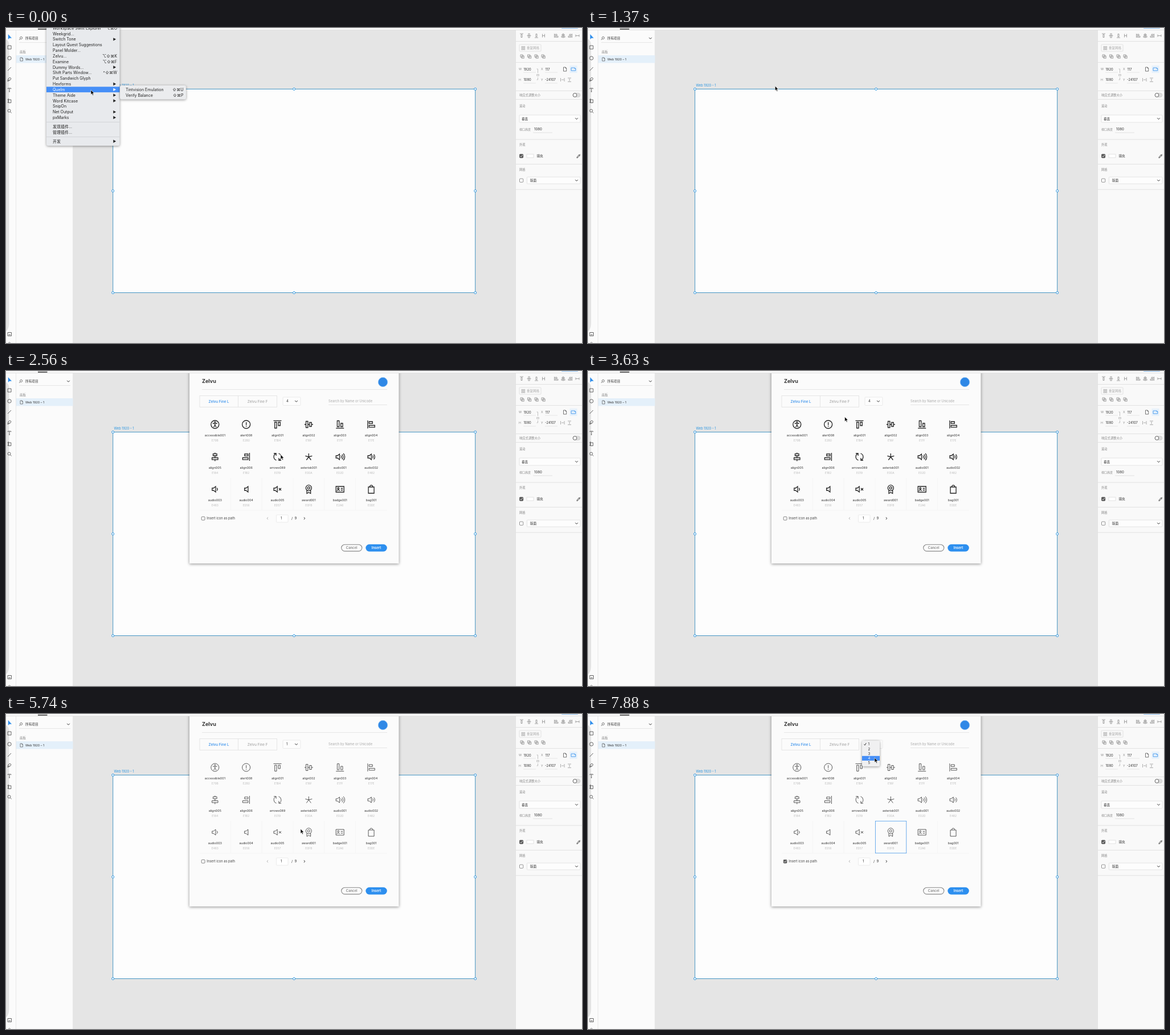
Write an HTML page that moves like this. It is 1011 px wide and 554 px high and loops after 8 s.

```html
<!DOCTYPE html>
<html lang="zh">
<head>
<meta charset="utf-8">
<style>
  html, body { margin: 0; width: 100%; height: 100%; overflow: hidden; background: #e5e5e5; }
  svg { display: block; width: 1011px; height: 554px; font-family: Inter, "Noto Sans CJK SC", "DejaVu Sans", sans-serif; }
  text { white-space: pre; }
  .menu { filter: drop-shadow(0 1px 2px rgba(0, 0, 0, .4)); }
  .sheet { filter: drop-shadow(0 1px 2.5px rgba(0, 0, 0, .45)); }
</style>
</head>
<body>
<svg id="stage" viewBox="0 0 1011 554"></svg>
<script>
const BLUE = '#2d8ceb', DARK = '#333', GRAY = '#999';

// Drawing helpers; text is centred vertically on y.
const text = (x, y, s, size = 5.6, fill = DARK, extra = '') =>
  `<text x="${x}" y="${y + size * .36}" font-size="${size}" fill="${fill}" ${extra}>${s}</text>`;
const mid = 'text-anchor="middle"', end = 'text-anchor="end"';
const rect = (x, y, w, h, fill = 'none', stroke = 'none', r = 0) =>
  `<rect x="${x}" y="${y}" width="${w}" height="${h}" rx="${r}" fill="${fill}" stroke="${stroke}" stroke-width=".8"/>`;
const path = (d, stroke = DARK, w = .8, fill = 'none', x = 0, y = 0) =>
  `<path d="${d}" transform="translate(${x} ${y})" fill="${fill}" stroke="${stroke}" stroke-width="${w}"/>`;
const group = (id, body, extra = '') => `<g id="${id}" ${extra}>${body}</g>`;
const ring = (r, x = 0, y = 0) => `M${x - r} ${y}a${r} ${r} 0 1 0 ${2 * r} 0a${r} ${r} 0 1 0 ${-2 * r} 0z`;
const box = (x, y, w, h) => `M${x} ${y}h${w}v${h}h${-w}z`;
const chevron = (x, y) => path('M-2.3-1.2L0 1.2L2.3-1.2', DARK, 1, 'none', x, y);
const hline = (x1, x2, y, color = '#e1e1e1') => path(`M${x1} ${y}H${x2}`, color, 1);

function leftPanel() {
  const tools = [
    [34, box(-3, -3, 6, 6)], [53, ring(3.2)], [72, 'M-3 3L3-3'],
    [90, 'M-3 3.5L-2-1L1-3L3-1L1 2zM-3 3.5L0 .5'], [109, 'M-2.8-1.8V-3H2.8V-1.8M0-3V3M-1 3H1'],
    [128, 'M-1.8-4V2.8H-3.5M-3.5-2H2.8V3.5H-1.8V-2'], [146, ring(2.5, -.5, -.5) + 'M1.4 1.4L3.6 3.6'],
    [538.5, box(-3, -3, 6.5, 6) + 'M-1.5 1H2']
  ];
  return rect(0, 4, 118, 550, '#fbfbfb') +
    path('M0 20Q5 23 5 30V518Q5 529 0 533z', '#d5d5d5', .5, '#e4e4e4') +
    path('M17.5 4V554M117.5 4V554', '#e2e2e2', .8) +
    path('M-2-4V4L0 2H3.5z', BLUE, .5, BLUE, 6, 15.5) +
    tools.map(([y, d]) => path(d, '#555', .9, 'none', 6, y)).join('') +
    path('M4 554L6 552.5L8 554', '#777') +
    path(ring(2, .6, -.6) + 'M-.9.9L-3 3', '#555', .8, 'none', 26, 18) +
    text(34, 18, '所有项目', 5.7) + chevron(109.5, 18) + hline(23, 113, 25.5, '#e6e6e6') +
    text(24, 42, '画板', 5.4, '#888') + rect(18, 48, 99.5, 13.5, '#e4f0fa') +
    path('M-2-3H1L2.4-1.6V3H-2zM1-3V-1.6H2.4', '#555', .7, 'none', 27, 55) +
    text(34, 54.8, 'Web 1920 – 1', 5.4);
}

function artboard() {
  const [l, t, r, b] = [187.7, 107.4, 823.7, 465.5], cx = 505.6, cy = 286.5;
  const knobs = [[l, t], [cx, t], [r, t], [l, cy], [r, cy], [l, b], [cx, b], [r, b]];
  return text(189.5, 101, 'Web 1920 – 1', 5.7, '#2a95e0') +
    path(box(l, t, r - l, b - t), '#4595c2', 1, '#fdfdfd') +
    knobs.map(([x, y]) => path(ring(2, x, y), '#2a95e0', 1, '#fff')).join('');
}

function rightPanel() {
  const label = (x, y, s, size = 5.2) => text(x, y, s, size, '#888');
  const bar = 'M-3-3.5H3M-1-2h2V3h-2z', flip = 'M-3 3.5H3M-1-3h2V2h-2z';
  const aligns = [[905, bar], [918, 'M-3.5 0H3.5M-1.2-3.5h2.4v7h-2.4z'], [931, flip], [943.5, 'M-2-3v6M2-3v6M-2 0h4'],
    [966, 'M-3.5-3.5v7M-2-2.5h3v2h-3zM-2 .8h5v2h-5z'], [978, 'M0-4V4M-2-2.5h4v2h-4zM-3 .8h6v2h-6z'],
    [990, 'M3.5-3.5v7M-1-2.5h3v2h-3zM-3 .8h5v2h-5z'], [1003, 'M-3-2v4M3-2v4M-3 0h6']];
  const overlap = box(-3, -3, 4.2, 4.2) + box(-1, -1, 4.2, 4.2);
  const check = 'M902.5 225l1.6 1.7l2.8-3.4';
  return rect(894, 4, 117, 550, '#f9f9f9') + path('M894.5 4V554', '#dcdcdc', .8) +
    aligns.map(([x, d]) => path(d, GRAY, .9, 'none', x, 13.5)).join('') +
    [906, 918.5, 931, 943].map(x => path(overlap, '#888', .8, 'none', x, 50)).join('') +
    [23.5, 60.5, 110.5, 125.5, 196, 239.5, 284].map(y => hline(895, 1011, y)).join('') +
    rect(901, 29, 38, 12, 'none', '#dcdcdc', 1) + path(box(905, 32.5, 2.2, 2.2) + box(908.5, 32.5, 2.2, 2.2) + box(905, 36, 2.2, 2.2) + box(908.5, 36, 2.2, 2.2), GRAY, .7) +
    text(914, 35, '重复网格', 5.5, '#aaa') +
    label(900, 72.5, 'W') + text(908.5, 72.5, '1920', 5.8) + label(939, 72.5, 'X') + text(946.5, 72.5, '117', 5.8) +
    label(900, 91, 'H') + text(908.5, 91, '1080', 5.8) + label(939, 91, 'Y') + text(946, 91, '-24107', 5.8) +
    [78, 97].map(y => hline(908, 930, y, '#e6e6e6') + hline(946, 968, y, '#e6e6e6')).join('') +
    path('M931.5 72h2v7M931.5 91h2v-4' + box(931.7, 81.5, 3.6, 2.6), '#aaa', .7) +
    path('M-2.5-3.5H1L2.7-1.8V3.5H-2.5zM1-3.5V-1.8H2.7', '#555', .8, 'none', 981, 72.5) +
    rect(989.5, 66, 13, 13, '#e6f1fb') + path('M-4-2.5H2.3L3.8-1V2.5H-4zM2.3-2.5V-1H3.8', BLUE, .8, 'none', 996, 72.5) +
    path('M973.5 88v6M980 88v6M975 91h4M986 88h6M986 94.5h6M989 89v4.5', GRAY) +
    label(901, 118, '响应式调整大小', 5.3) + rect(995, 114.5, 13, 7, '#ddd', '#ccc', 3.5) + path(ring(3.3, 998.5, 118), '#555', .9, '#fff') +
    label(901, 137.5, '滚动') + rect(901, 153, 107, 13, '#fdfdfd', '#ddd', 1) + text(905, 159.5, '垂直') + chevron(1001.5, 159.5) +
    label(901, 178, '视口高度', 5) + text(927, 178, '1080', 6) + hline(925, 959, 184) +
    label(901, 205.5, '外观') + rect(901.5, 222, 6.2, 6.2, '#555', '#555', 1) + path(check, '#fff', .9) +
    rect(914, 222, 12, 6, '#fff', '#ddd') + text(931.5, 225, '填充') +
    path('M-3 3.5L-2.5 1.5L1-2L2.2-.8L-1.3 2.8zM.2-2.4L2.6 0M1.4-1.6L3-3', '#444', 1, 'none', 1005, 225) +
    label(901, 249.5, '网格') + rect(901.5, 265, 6.2, 6.2, '#fff', '#777', 1) +
    rect(914.5, 262, 93.5, 12, '#fdfdfd', '#ddd', 1) + text(920, 268, '版面') + chevron(1001.5, 268);
}

const MENU = [['Workspace Swift Explorer', '⌥⌘O'], ['Weekgrid...'], ['Switch Tone', 1], ['Layout Quest Suggestions'], ['Panel Molder...'],
  ['Zelvu...', '⌥⇧⌘K'], ['Examine', '⌥⇧⌘F'], ['Dummy Words...', 1], ['Shift Parts Window...', '^⇧⌘W'], ['Put Sandwich Glyph'],
  ['Hexforms', 1], ['Quelm', 1], ['Theme Aide', 1], ['Word Kitcase', 1], ['SnipOn'], ['Net Output', 1], ['pxMarks', 1]];
const rowY = i => .2 + 9.83 * i;

function menuRow([name, key], y, color) {
  const right = key === 1 ? path('M0-2.7L4.8 0L0 2.7z', 'none', 0, color, 188.3, y) : key ? text(195, y, key, 7, color, end) : '';
  return text(82, y, name, 7, color) + right;
}

function menu(active) {
  const y = rowY(active);
  const sub = active === 11 ? group('sub', rect(200, 101, 116, 24.5, '#ebecee', 'none', 3) +
    text(210, 108.2, 'Tintvision Emulation', 7, '#222') + text(311.5, 108.2, '⇧⌘U', 7, '#222', end) +
    text(210, 118, 'Verify Balance', 7, '#222') + text(311.5, 118, '⇧⌘P', 7, '#222', end), 'class="menu"') : '';
  return group('list', rect(71, -6, 128.5, 213, '#e8eaed', 'none', 3), 'class="menu"') +
    rect(71, y - 5, 128.5, 9.8, '#468ff7') +
    MENU.map((m, i) => menuRow(m, rowY(i), i === active ? '#fff' : '#222')).join('') +
    hline(71, 199.5, 165.5, '#d2d4d8') + hline(71, 199.5, 191.5, '#d2d4d8') +
    menuRow(['发现插件...'], 173.5, '#222') + menuRow(['管理插件...'], 183.5, '#222') + menuRow(['开发', 1], 199.3, '#222') + sub;
}

// Each icon: body (solid in the filled set), inner (white when filled), extra lines.
const speaker = x => `M${x}-2h2.5l3.7-3V5l-3.7-3h-2.5z`;
const waves = (x, n) => [2.4, 4.2, 6].slice(0, n).map((h, i) => `M${x + 2.2 * i}${-h}a${h * 1.4} ${h * 1.4} 0 0 1 0 ${2 * h}`).join('');
const ICONS = {
  accessible001: ['E79B', ring(7), ring(.9, 0, -4) + 'M-4-2L0-1.4L4-2M0-1.4V1.2M-2.4 5L0 1.2L2.4 5', ''],
  alert002: ['E293', 'M-1-6.5H1L.5 2H-.5z' + box(-.6, 5, 1.2, 1.2), '', ''],
  alert008: ['E2B0', ring(7), 'M0-4V1.2M0 2.6V4', ''],
  align001: ['E1B4', box(-4.8, -4, 3.3, 10.5) + box(1.5, -4, 3.3, 6), '', 'M-7-6.6H7'],
  align002: ['E18F', box(-4.8, -5.5, 3.3, 11) + box(1.5, -3.5, 3.3, 7), '', 'M-7.5 0h2.7M-1.5 0h3M4.8 0h2.7'],
  align003: ['E17F', box(-4.8, -6.5, 3.3, 10.5) + box(1.5, -2, 3.3, 6), '', 'M-7 6.6H7'],
  align004: ['E17E', box(-3.8, -5, 6, 3.4) + box(-3.8, 1.5, 10, 3.4), '', 'M-6.2-7V7'],
  align005: ['E184', box(-3.3, -5.4, 6.6, 3.4) + box(-5.2, 1.5, 10.4, 3.4), '', 'M0-7.5v2.1M0-2v3.5M0 4.9v2.6'],
  align006: ['E1B2', box(-2.8, -5, 6, 3.4) + box(-6.3, 1.5, 9.5, 3.4), '', 'M5.8-7V7'],
  arrows089: ['E019', '', '', 'M-6.5-6H-2.4V-2M-2.6-5.8A6.3 6.3 0 0 0-2 6M6.5 6H2.4V2M2.6 5.8A6.3 6.3 0 0 0 2-6'],
  asterisk001: ['E00A', '', '', 'M0-6V0M-6-1.6L0 0L6-1.6M-4 5.5L0 0L4 5.5'],
  audio001: ['E02D', speaker(-7), '', waves(1.5, 3)],
  audio002: ['E482', speaker(-6), '', waves(2.3, 2)],
  audio003: ['E483', speaker(-5), '', waves(3.4, 1)],
  audio004: ['E056', speaker(-3), '', ''],
  audio005: ['E057', speaker(-6.5), '', 'M2.5-2l4 4M6.5-2l-4 4'],
  audio007: ['E00C', ring(7), speaker(-3.5), ''],
  award001: ['E0FB', ring(5, 0, -2.3) + 'M-3.3 1.6V7.3L0 5.4L3.3 7.3V1.6', ring(2.1, 0, -2.3), ''],
  badge001: ['E2A6', box(-7, -5, 14, 10), ring(1.4, -3, -1.5) + 'M-5.3 2.8a2.4 2 0 0 1 4.7 0M1.5-1.5H5M1.5 1.5H5', ''],
  bag001: ['E0DE', box(-5, -4, 10, 11), '', 'M-2.5-4V-4.6a2.5 2.5 0 0 1 5 0V-4'],
  balloon001: ['E23D', 'M-2.2 3.2C-2.8 2-5.3 1-5.3-1.8A5.3 5.3 0 0 1 5.3-1.8C5.3 1 2.8 2 2.2 3.2z' + box(-1.5, 5, 3, 2), '', ''],
  battery001: ['E37F', '', '', box(-8, -3.7, 14, 7.4) + 'M7.8-1.5v3']
};
const ALIGNS = [1, 2, 3, 4, 5, 6].map(n => 'align00' + n);
const LINE_SET = ['accessible001', 'alert008', ...ALIGNS, 'arrows089', 'asterisk001', 'audio001', 'audio002',
  'audio003', 'audio004', 'audio005', 'award001', 'badge001', 'bag001'];
const FILL_SET = ['accessible001', 'alert002', 'alert008', ...ALIGNS, 'arrows089', 'audio001', 'audio005',
  'audio007', 'award001', 'badge001', 'bag001', 'balloon001', 'battery001'];

function iconCell(name, i, filled, weight) {
  const x = 366.8 + 54.85 * (i % 6), y = 94 + 57 * Math.floor(i / 6);
  const [code, body, inner, extra] = ICONS[name], w = weight === 4 ? 1.3 : .75, ink = filled ? '#000' : '#222';
  return path(box(-27.4, -37 + 31, 0, 0), 'none') +
    path(body, ink, w, filled ? ink : 'none', x, y) + path(inner, filled ? '#fff' : ink, w, 'none', x, y) + path(extra, ink, w, 'none', x, y) +
    text(x, y + 19.5, name, 5.4, DARK, mid) + text(x, y + 28.5, code, 4.9, '#bbb', mid);
}

function sheet({ filled, weight, checked, selected }) {
  const tab = (x, s, on) => text(x, 53.6, s, 6.2, on ? BLUE : GRAY, mid + (on ? ' font-weight="500"' : ''));
  return rect(322, -10, 367.5, 348.5, '#fbfbfb') +
    text(344, 17.5, 'Zelvu', 9, DARK, 'font-weight="700"') + path(ring(8.2, 661.5, 19.5), '#8cc0f5', .8, '#2f88e6') + hline(344, 669, 32.5, '#e6e6e6') +
    rect(340, 43.5, 135.5, 20, 'none', '#e0e0e0') + path('M407.5 43.5v20', '#e0e0e0') +
    tab(373.5, 'Zelvu Fine L', !filled) + tab(441.5, 'Zelvu Fine F', filled) +
    rect(486, 46, 31, 14.5, '#fdfdfd', '#e6e6e6', 1) + text(492, 53.2, weight, 6) + chevron(509.5, 53.2) +
    text(566, 53.3, 'Search by Name or Unicode', 5.8, '#aaa') + hline(566, 669, 59.5, '#e6e6e6') +
    path([1, 2, 3, 4, 5].map(i => `M${339.4 + 54.85 * i} 188V245`).join('') + 'M340 244.8H669', '#f4f4f4', .8) +
    (filled ? FILL_SET : LINE_SET).map((n, i) => iconCell(n, i, filled, weight)).join('') +
    (selected ? rect(504.4, 188.3, 54.4, 56.4, 'none', '#4a9cec') : '') +
    rect(343.2, 256.4, 5.8, 5.8, checked ? '#555' : '#fff', '#666', 1) + (checked ? path('M344.3 259.3l1.4 1.5l2.4-3', '#fff', .9) : '') +
    text(352.3, 259.2, 'Insert icon as path', 5.7, '#444') +
    path('M459.8 257.2l-1.6 2l1.6 2', '#aaa', .9) + rect(474.5, 253, 20.5, 13, '#fff', '#e6e6e6', 1) + text(482, 259.3, '1', 6) +
    text(501, 259.3, '/  9', 6) + path('M523 257.2l1.6 2l-1.6 2', DARK, 1) +
    path('M594.5 305.3H619a5.8 5.8 0 0 1 0 11.6H594.5a5.8 5.8 0 0 1 0-11.6z', '#888', 1.1) + text(606.7, 311.2, 'Cancel', 5.9, '#888', mid + ' font-weight="600"') +
    rect(631.3, 304.8, 37.5, 12.6, '#2d8fef', 'none', 6.3) + text(650, 311.2, 'Insert', 5.9, '#fff', mid + ' font-weight="600"');
}

function dropdown(active) {
  const y = i => 53.2 + 8.2 * i;
  return group('drop', rect(481, 47, 31, 45, '#f0f0f1', 'none', 2.5), 'class="menu"') + rect(481, y(active) - 4, 31, 8.2, '#468ff7') +
    [0, 1, 2, 3, 4].map(i => text(491.5, y(i), i + 1, 6, i === active ? '#fff' : '#222')).join('') + path('M484.5 53.3l1.4 1.7l2.4-4', '#222', .9);
}

// Pointer stops as [time, x, y]; travel between them is sampled about every 178 ms.
const STOPS = [[0, 149, 109], [180, 147, 85], [509, 147, 85], [510, 148, 60], [690, 149, 50], [1009, 149, 50], [1010, 234, 59],
  [1570, 517, 188], [1960, 512, 181], [2170, 508, 176], [2560, 482, 147], [3100, 477, 149], [3280, 472, 132],
  [3800, 440, 55], [4160, 391, 57], [4330, 376, 55], [4840, 376, 55], [5740, 517, 202], [5910, 522, 205],
  [6090, 522, 207], [6600, 347, 260], [6800, 348, 262], [6980, 365, 250], [7500, 493, 54], [7880, 503, 77], [8000, 503, 77]];

function pointer(t) {
  const i = STOPS.findIndex(s => s[0] > t) - 1, [a, ax, ay] = STOPS[i], [b, bx, by] = STOPS[i + 1];
  const n = Math.max(1, Math.round((b - a) / 178)), u = Math.floor((t - a) / (b - a) * n) / n;
  return [ax + (bx - ax) * u, ay + (by - ay) * u];
}

const stage = document.getElementById('stage');
stage.innerHTML = '<clipPath id="below"><rect y="4" width="1011" height="550"/></clipPath>' +
  rect(0, 0, 1011, 554, '#e5e5e5') + rect(0, 0, 1011, 3.5, '#fafafa') + hline(0, 1011, 3.7, '#dedede') +
  rect(56, 1, 16.5, 1.8, '#555') + rect(975, -3, 29, 3.6, BLUE, 'none', 1) +
  leftPanel() + artboard() + rightPanel() + group('menu', '') +
  `<g clip-path="url(#below)">${group('sheet', '', 'class="sheet"')}</g>` + group('drops', '') +
  group('pointer', path('M0 0V8.2L1.9 6.4L3.2 9.4L4.6 8.8L3.3 5.9H5.8z', '#fff', .6, '#000'));

const shown = {};
function show(id, html) {
  if (shown[id] !== html) document.getElementById(id).innerHTML = shown[id] = html;
}

function frame(now) {
  const t = now % 8000, [x, y] = pointer(t);
  const filled = t >= 3800 && t < 4840;
  show('menu', t < 1190 ? menu(t < 510 ? 11 : t < 690 ? 6 : 5) : '');
  show('sheet', t < 1570 ? '' : sheet({ filled, weight: t < 3800 ? 4 : 1, checked: t >= 6600, selected: t >= 6090 }));
  document.getElementById('sheet').setAttribute('transform', `translate(0 ${t < 1780 ? -229 : 0})`);
  show('drops', t >= 7500 ? dropdown(Math.min(4, Math.max(0, Math.round((y - 48.5) / 8.2)))) : '');
  document.getElementById('pointer').setAttribute('transform', `translate(${x} ${y})`);
  requestAnimationFrame(frame);
}
requestAnimationFrame(frame);
</script>
</body>
</html>
```
